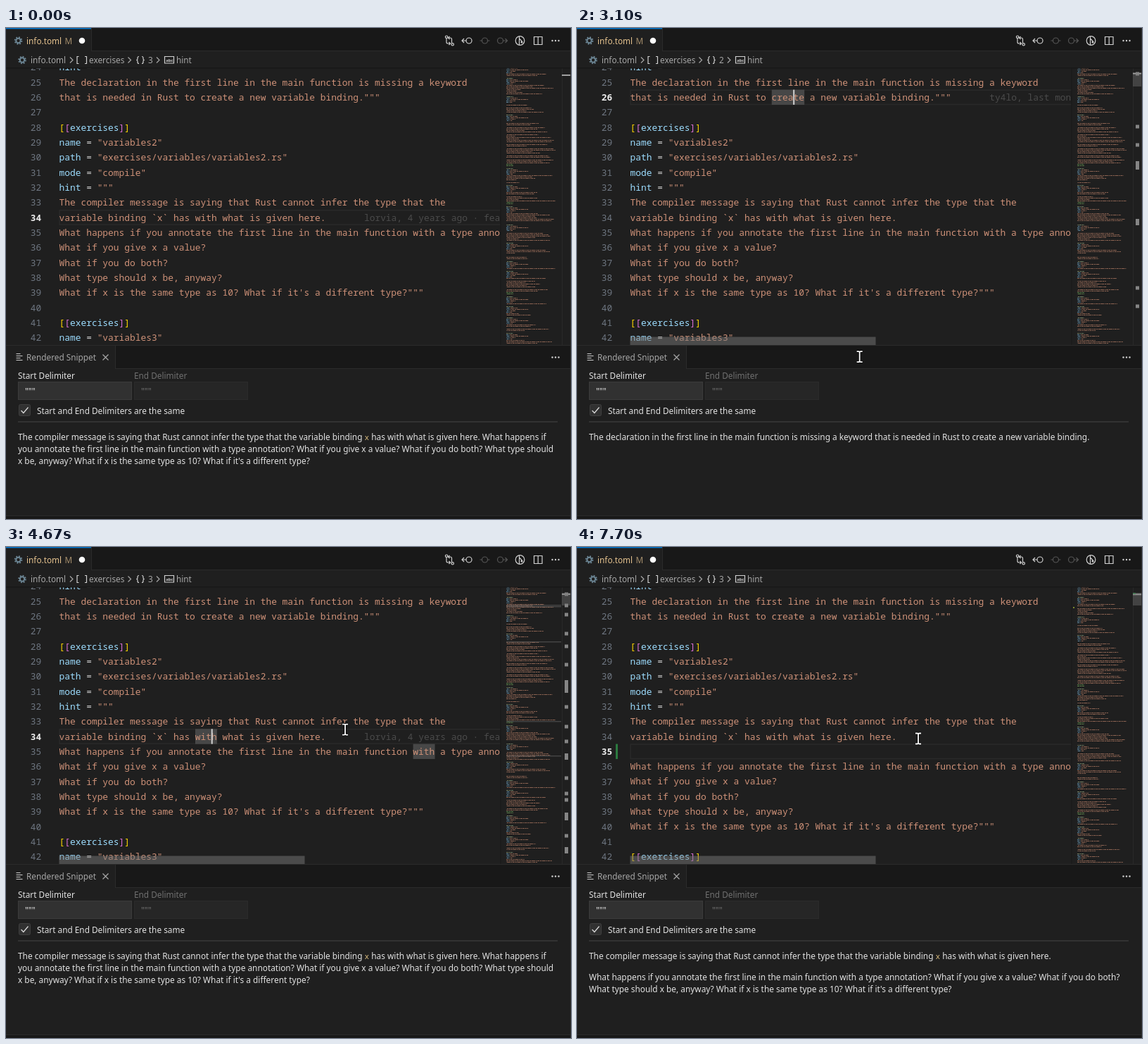
An HTML page for the animation above (8000 ms loop, 803x697 px).

```html
<!DOCTYPE html>
<html lang="en">
<head>
<meta charset="utf-8">
<title>Rendered snippet</title>
<style>
  html, body { margin: 0; width: 100%; height: 100%; overflow: hidden; background: #1f1f1f; }
  svg { display: block; width: 100vw; height: 100vh; }
  text { white-space: pre; font: 11.8px "Noto Sans", sans-serif; fill: #ccc; }
  .code { font: 500 12.9px "Noto Sans Mono", monospace; }
  .num { fill: #6e7681; text-anchor: end; font-weight: 400; }
  .num.on { fill: #eee; font-weight: 600; }
  .page { font-size: 11.86px; }
  .page, .bright { fill: #e2e2e2; }
  .dim { fill: #a6a6a6; }
  .off { fill: #707070; }
  .icon { fill: none; stroke: #d0d0d0; stroke-width: 1.2; }
</style>
</head>
<body>
<svg id="stage" viewBox="0 0 803 697">
  <defs>
    <clipPath id="codeClip"><rect x="0" y="57" width="702.5" height="393"/></clipPath>
    <clipPath id="mapClip"><rect x="704" y="57" width="86" height="392"/></clipPath>
  </defs>
</svg>
<script>
const LOOP = 8000, LINE = 64 / 3, CHAR = 7.74, LEFT = 75.5;
const STRING = '#ce9178', KEY = '#9cdcfe', PLAIN = '#cccccc', BRIGHT = '#e2e2e2', GOLD = '#ffd700', ORCHID = '#da70d6';
const stage = document.getElementById('stage');

function add(parent, tag, attrs = {}) {
  const el = document.createElementNS('http://www.w3.org/2000/svg', tag);
  for (const name in attrs) el.setAttribute(name, attrs[name]);
  parent.append(el);
  return el;
}
const group = (parent = stage, attrs) => add(parent, 'g', attrs);
const box = (parent, x, y, width, height, fill, more) =>
  add(parent, 'rect', { x, y, width, height, fill, ...more });
const icon = (d, more) => add(stage, 'path', { d, class: 'icon', ...more });
function label(parent, x, y, content, cls = '', more) {
  const el = add(parent, 'text', { x, y, class: cls, ...more });
  if (typeof content === 'string') el.textContent = content;
  else for (const [fill, part, css = ''] of content) {
    add(el, 'tspan', { style: `fill:${fill};${css}` }).textContent = part;
  }
  return el;
}
const show = (el, on) => { el.style.visibility = on ? 'visible' : 'hidden'; };
const rowTop = n => 258.3 + (n - 34) * LINE;
const baseline = n => Math.round(rowTop(n) + 15.4);
const colX = c => LEFT + c * CHAR;

// Code lines
const header = [[GOLD, '['], [ORCHID, '['], [KEY, 'exercises'], [ORCHID, ']'], [GOLD, ']']];
const pair = (key, value) => [[KEY, key], [PLAIN, ' = '], [STRING, value]];
const prose = s => [[STRING, s]];
const lines = [
  pair('hint', '"""'),
  prose('The declaration in the first line in the main function is missing a keyword'),
  prose('that is needed in Rust to create a new variable binding."""'),
  prose(''),
  header,
  pair('name', '"variables2"'),
  pair('path', '"exercises/variables/variables2.rs"'),
  pair('mode', '"compile"'),
  pair('hint', '"""'),
  prose('The compiler message is saying that Rust cannot infer the type that the'),
  prose('variable binding `x` has with what is given here.'),
  prose('What happens if you annotate the first line in the main function with a type annotation?'),
  prose('What if you give x a value?'),
  prose('What if you do both?'),
  prose('What type should x be, anyway?'),
  prose('What if x is the same type as 10? What if it\'s a different type?"""'),
  prose(''),
  header,
  pair('name', '"variables3"')
];

// Editor
const editor = group(stage, { 'clip-path': 'url(#codeClip)' });
const lineBox = box(editor, 76, 0, 640, LINE - 1, 'none', { stroke: '#292929', 'stroke-width': 1.6 });
const word = (row, col, length) =>
  box(editor, colX(col), rowTop(row), length * CHAR, LINE, '#575757', { opacity: .72 });
const createWord = word(26, 26, 6);
const withWords = [word(34, 25, 4), word(35, 65, 4)];
const upper = group(editor), lower = group(editor);
const numbers = {};
lines.forEach((runs, i) => {
  const n = 24 + i;
  numbers[n] = label(editor, 50.3, baseline(n), String(n), 'code num');
  label(n < 35 ? upper : lower, LEFT, baseline(n), runs, 'code');
});
const blame = (row, col, s) => label(editor, colX(col), baseline(row), [['#4b4b4b', s]], 'code');
const blame26 = blame(26, 66, 'ty4lo, last month');
const blame34 = blame(34, 56, 'lorvia, 4 years ago · feat');
const addedBar = box(editor, 55, rowTop(35), 3, LINE, '#2b7a3f');
const caret = box(editor, 0, 0, 2, LINE, '#d0d0d0');

// Minimap
const map = group(stage, { 'clip-path': 'url(#mapClip)', opacity: .78 });
const mapUpper = group(map), mapLower = group(map);
let seed = 11;
const random = () => (seed = seed * 16807 % 2147483647) / 2147483647;
function mapRow(y, x, chars, color) {
  add(y < 85 ? mapUpper : mapLower, 'path', {
    d: `M${711 + x * .76} ${y + .5}h${Math.min(chars * .76, 79)}`, stroke: color, 'stroke-width': 1,
    'stroke-dasharray': '3 .8 2.2 .7 5 .8 1.5 .7', 'stroke-dashoffset': (y * 3) % 15
  });
}
function mapHeader(y) {
  mapRow(y, 0, 13, '#8b9b78');
  [14, 34, 10, 5].forEach((size, i) => {
    mapRow(y + 2 + i * 2, 0, 6, '#6fa4c4');
    mapRow(y + 2 + i * 2, 7, size, '#a8755f');
  });
}
const heads = [55, 71, 97, 123, 199, 223, 253, 279, 305, 331, 345, 381, 395, 411, 433, 455];
heads.slice(0, -1).forEach((head, i) => {
  mapHeader(head);
  const end = heads[i + 1] - 3, titled = [199, 253, 381].includes(heads[i + 1]);
  for (let y = head + 10; y < end; y += 2) {
    const n = 28 + (y - 71) / 2;
    if (n <= 42) mapRow(y, 0, lines[Math.max(0, n - 24)].reduce((sum, r) => sum + r[1].length, 0), '#a8755f');
    else if (titled && y > end - 4) mapRow(y, 0, 13, '#6a9955');
    else if (random() > .18) mapRow(y, 0, 16 + random() * 76, '#a8755f');
  }
});
box(stage, 702.5, 57, 1, 393, '#191919');
const addedDot = box(stage, 705, 85, 2, 2, '#7d8a2c');

// Overview ruler
box(stage, 790, 57, 1, 393, '#292929');
const rulerCursor = box(stage, 790, 66, 12, 2, '#a0a0a0');
function rulerMarks(ys, tall) {
  const g = group();
  ys.forEach(y => box(g, 794, y - 2.5, 5, 5, '#858585'));
  tall.forEach(([y, h]) => box(g, 794, y, 5, h, '#858585'));
  return g;
}
const createMarks = rulerMarks([65, 140, 166, 369, 395], [[189, 12], [271, 9]]);
const withMarks = rulerMarks([67, 83, 96, 123, 141, 167, 227, 255, 276, 328, 350, 359, 410],
  [[189, 18], [293, 9], [377, 11], [426, 9]]);
[82, 84, 134, 247, 296].forEach(y => box(withMarks, 711, y, 78, 1.4, '#777', { opacity: .45 }));
const addedMark = box(stage, 790, 65, 4, 2, '#2b7a3f');
const bars = group();
box(bars, 790, 65, 12, 18, '#797979', { opacity: .4 });
box(bars, 75.5, 438.5, 349, 11.5, '#797979', { opacity: .5 });

// Tab strip and breadcrumbs
box(stage, 0, 0, 803, 33, '#181818');
box(stage, 121, 32, 682, 1, '#2b2b2b');
box(stage, 0, 0, 121, 57, '#1f1f1f');
box(stage, 121, 33, 682, 24, '#1f1f1f');
box(stage, 121, 0, 1, 33, '#2b2b2b');
box(stage, 0, 0, 121, 1.4, '#0078d4');
box(stage, 0, 56, 803, 1.5, '#181818');
function gear(x, y) {
  add(stage, 'circle', { cx: x, cy: y, r: 3.2, fill: 'none', stroke: '#6d8796', 'stroke-width': 2 });
  add(stage, 'circle', { cx: x, cy: y, r: 4.9, fill: 'none', stroke: '#6d8796', 'stroke-width': 1.8,
    'stroke-dasharray': '1.92 1.92' });
}
gear(17.5, 18);
gear(23, 45.5);
label(stage, 29, 23, [['#e2c08d', 'info.toml']]);
label(stage, 83.5, 23, [['#a48d6b', 'M']]);
add(stage, 'circle', { cx: 108, cy: 18, r: 4.3, fill: '#fff' });
label(stage, 35, 50, 'info.toml', 'dim');
label(stage, 118, 50, 'exercises', 'dim');
label(stage, 242, 50, 'hint', 'dim');
const crumb = label(stage, 202, 50, '3', 'dim');
[91, 173.5, 214].forEach(x => icon(`M${x} 41.5l4 4-4 4`, { style: 'stroke:#a6a6a6' }));
icon('M103.5 40.5h-2.5v10h2.5M112 40.5h2.5v10h-2.5');
icon('M189 40.5q-2 0-2 2v1.5q0 1.5-1.8 1.5q1.8 0 1.8 1.5v1.5q0 2 2 2M193 40.5q2 0 2 2v1.5q0 1.5 1.8 1.5q-1.8 0-1.8 1.5v1.5q0 2-2 2');
icon('M225.5 40.5h13v9.5h-13z');
label(stage, 227.2, 47.6, 'abc', '', { style: 'font-size:6px;font-weight:700' });

// Toolbar
icon('M626 14.5v5.5q0 2 2 2h3M629.5 20l2 2-2 2M633.5 21.5V16q0-2-2-2h-2M630.5 12l-2 2 2 2');
icon('M627.8 12.7a1.7 1.7 0 1 0-3.4 0a1.7 1.7 0 1 0 3.4 0M636.4 23.3a1.7 1.7 0 1 0-3.4 0a1.7 1.7 0 1 0 3.4 0');
const ring = (cx, r, stroke) => add(stage, 'circle', { cx, cy: 18, r, class: 'icon', style: `stroke:${stroke}` });
ring(658, 4, '#d0d0d0');
icon('M654 18h-6M651 15l-3 3 3 3');
ring(680.5, 4, '#555');
icon('M673.5 18h3M684.5 18h3', { style: 'stroke:#555' });
ring(702.5, 4, '#555');
icon('M706.5 18h6M709.5 15l3 3-3 3', { style: 'stroke:#555' });
ring(730.5, 6.3, '#d0d0d0');
icon('M729.5 12v12M729.5 15l3.5 3.5v2');
add(stage, 'circle', { cx: 733, cy: 20, r: 1.5, fill: '#d0d0d0' });
icon('M750.5 12.5h11.5v11h-11.5zM756.2 12.5v11');
function dots(y) {
  [776.5, 781, 785.5].forEach(cx => add(stage, 'circle', { cx, cy: y, r: 1.2, fill: '#d0d0d0' }));
}
dots(18);

// Snippet panel
box(stage, 0, 450, 803, 247, '#1f1f1f');
box(stage, 155, 451, 648, 33, '#181818');
box(stage, 0, 450, 803, 1, '#2b2b2b');
box(stage, 155, 451, 1, 33, '#2b2b2b');
box(stage, 155, 483, 648, 1, '#2b2b2b');
icon('M14.5 462.5h6M14.5 465.5h9M14.5 468.5h6M14.5 471.5h9');
label(stage, 29, 472, 'Rendered Snippet', 'dim');
icon('M137.5 463.5l8 8M145.5 463.5l-8 8', { style: 'stroke:#a6a6a6' });
dots(467.5);
label(stage, 17, 497.5, 'Start Delimiter', 'bright');
label(stage, 182, 497.5, 'End Delimiter', 'off');
box(stage, 17.5, 502.5, 161, 25, '#313131', { stroke: '#3c3c3c' });
box(stage, 182.5, 502.5, 161, 25, '#262626', { stroke: '#2b2b2b' });
label(stage, 27, 520, '"""', 'bright');
label(stage, 192, 520, '"""', 'off');
box(stage, 18.5, 534.5, 16, 16, '#313131', { stroke: '#3f3f3f', rx: 2 });
icon('M21.5 543l3.3 3.5 6.7-8', { style: 'stroke:#ddd' });
label(stage, 44, 548, 'Start and End Delimiters are the same', 'bright');
box(stage, 17, 558.5, 767, 1, '#474747');
box(stage, 0, 692, 803, 5, '#181818');
box(stage, 0, 692, 803, 1, '#2b2b2b');
box(stage, 802, 0, 1, 697, '#2b2b2b');

function page(...rows) {
  const g = group();
  rows.forEach(([y, content]) => label(g, 17, y, content, 'page'));
  return g;
}
const opening = tail => [
  [BRIGHT, 'The compiler message is saying that Rust cannot infer the type that the variable binding '],
  ['#d7ba7d', 'x', 'font:500 11px "Noto Sans Mono",monospace'],
  [BRIGHT, ' has with what is given here.' + tail]
];
const joinedPage = page(
  [585, opening(' What happens if')],
  [602, 'you annotate the first line in the main function with a type annotation? What if you give x a value? What if you do both? What type should'],
  [619, 'x be, anyway? What if x is the same type as 10? What if it\'s a different type?']);
const keywordPage = page(
  [585, 'The declaration in the first line in the main function is missing a keyword that is needed in Rust to create a new variable binding.']);
const splitPage = page(
  [585, opening('')],
  [615, 'What happens if you annotate the first line in the main function with a type annotation? What if you give x a value? What if you do both?'],
  [632, 'What type should x be, anyway? What if x is the same type as 10? What if it\'s a different type?']);

// Mouse pointer
const pointer = group();
const beam = 'M-4 -7.5h2.5q1.5 0 1.5 1.5q0-1.5 1.5-1.5h2.5M0 -6V6M-4 7.5h2.5q1.5 0 1.5-1.5q0 1.5 1.5 1.5h2.5';
add(pointer, 'path', { d: beam, fill: 'none', stroke: '#000', 'stroke-width': 3.6 });
add(pointer, 'path', { d: beam, fill: 'none', stroke: '#fff', 'stroke-width': 1.8 });

// Time, x, y
const route = [
  [630, 345, 708], [1000, 330, 400], [1300, 314, 140], [1430, 311, 110], [1470, 311, 110], [1600, 311, 96],
  [2070, 311, 96], [2400, 264, 432], [2600, 130, 582], [2870, 470, 586], [2900, 470, 584],
  [3400, 300, 292], [3530, 292, 272], [3670, 291, 282], [3730, 291, 282], [4000, 110, 592],
  [4150, 90, 617], [4450, 410, 610], [4570, 450, 426], [4670, 482, 259], [4850, 486, 268], [5070, 485, 272]
];
function along(t) {
  const i = route.findIndex(stop => stop[0] > t);
  if (i < 0) return route[route.length - 1].slice(1);
  if (i === 0) return route[0].slice(1);
  const [t0, x0, y0] = route[i - 1], [t1, x1, y1] = route[i], k = (t - t0) / (t1 - t0);
  return [x0 + (x1 - x0) * k, y0 + (y1 - y0) * k];
}

// Time, row, column of each caret move
const FIRST = 1870, SECOND = 3530, THIRD = 4970, ENTER = 6000;
const moves = [[FIRST, 26, 30], [SECOND, 34, 28], [THIRD, 34, 49], [ENTER, 35, 0], [6900, 36, 0], [7170, 35, 0]];

function draw(t) {
  const between = (a, b) => t >= a && t < b;
  const [x, y] = along(t);
  pointer.setAttribute('transform', `translate(${x} ${y})`);
  show(pointer, t >= 630);
  bars.style.opacity = Math.min(1, Math.max(0, (t - 940) / 100));

  const move = moves.filter(m => m[0] <= t).pop();
  const row = move ? move[1] : 34;
  show(caret, move && (t - move[0]) % 1000 < 500);
  if (move) caret.setAttribute('x', colX(move[2]) - .5);
  caret.setAttribute('y', rowTop(row));
  lineBox.setAttribute('y', rowTop(row) + .5);
  rulerCursor.setAttribute('y', 66 + (row - 34) * .3);
  for (const n in numbers) numbers[n].classList.toggle('on', +n === row);

  const first = between(2100, SECOND), second = between(3780, THIRD), split = t >= ENTER;
  show(createWord, first);
  show(createMarks, first);
  [...withWords, withMarks].forEach(el => show(el, second));
  show(blame26, between(2130, SECOND));
  show(blame34, t < FIRST || between(3760, ENTER));
  crumb.textContent = between(2100, 3640) ? '2' : '3';

  lower.setAttribute('transform', `translate(0 ${split ? LINE : 0})`);
  mapLower.setAttribute('transform', `translate(0 ${split ? 2 : 0})`);
  [addedBar, addedMark, addedDot].forEach(el => show(el, t >= 6200));

  const keyword = between(1930, 3560);
  show(keywordPage, keyword);
  show(joinedPage, !keyword && !split);
  show(splitPage, split);
}

const start = performance.now();
function tick() {
  draw((performance.now() - start) % LOOP);
  requestAnimationFrame(tick);
}
tick();
</script>
</body>
</html>
```
